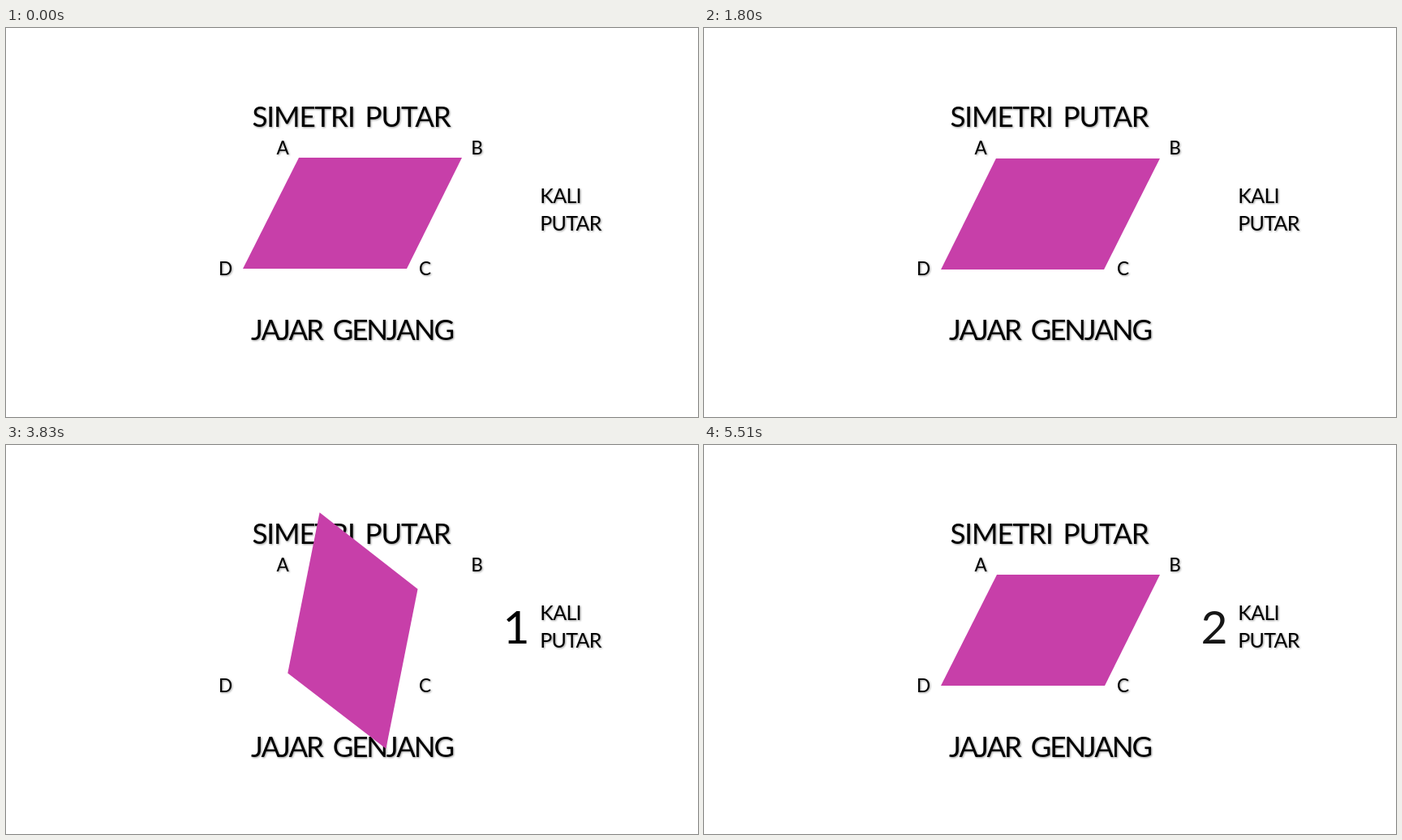
These frames come from a looping animation (853 by 480 pixels, 5.57 s). An HTML page:

```html
<!DOCTYPE html>
<html lang="id">
<head>
<meta charset="utf-8">
<title>Simetri Putar</title>
<style>
  html, body { margin: 0; width: 100%; height: 100%; overflow: hidden; background: #fff; }
  svg { display: block; width: 100vw; height: 100vh; }
  text { font-family: Lato, "Open Sans", sans-serif; fill: #000; text-anchor: middle; }
  .shade { filter: drop-shadow(1.2px 1.2px 0.8px rgba(0, 0, 0, 0.4)); }
  .title { font-size: 35px; letter-spacing: -1.1px; word-spacing: 5px; }
  .tight { letter-spacing: -2.1px; word-spacing: 6px; }
  .label { font-size: 22.5px; }
  .side { font-size: 25px; letter-spacing: -0.7px; text-anchor: start; }
  .digit { font-size: 57px; }
</style>
</head>
<body>
<svg viewBox="0 0 853 480">
  <g class="shade">
    <text class="title" x="425.5" y="122">SIMETRI PUTAR</text>
    <text class="title tight" x="426.5" y="385">JAJAR GENJANG</text>
    <text class="side" x="658.3" y="215.5">KALI</text>
    <text class="side" x="658.3" y="249.5">PUTAR</text>
  </g>
  <polygon id="shape" points="361,160 562,160 494,297 292,297" fill="#c73fa9"/>
  <g class="shade">
    <text class="label" x="341" y="156">A</text>
    <text class="label" x="580.5" y="156">B</text>
    <text class="label" x="516.5" y="304.5">C</text>
    <text class="label" x="270.5" y="304.5">D</text>
  </g>
  <text class="digit" id="one" x="629" y="245">1</text>
  <text class="digit" id="two" x="629" y="245">2</text>
</svg>
<script>
  const LOOP = 5570, STEP = 60;
  const [shape, one, two] = ["shape", "one", "two"].map(id => document.getElementById(id));
  const clamp = (v, lo = 0, hi = 1) => Math.min(hi, Math.max(lo, v));

  // Whole steps elapsed since a start time
  const steps = (t, start) => Math.floor((t - start) / STEP);

  // Half turn: speed ramps up over `ramp` steps, cruises, then ramps down
  function halfTurn(n, start, length, ramp) {
    const x = clamp(n - start, 0, length);
    const speed = 180 / (length - ramp);
    const ease = d => speed * d * d / (2 * ramp);
    if (x < ramp) return ease(x);
    if (x > length - ramp) return 180 - ease(length - x);
    return speed * (x - ramp / 2);
  }

  function angleAt(t) {
    if (t < 1860) return halfTurn(steps(t, 0), 0.03, 30.26, 6.1);
    if (t >= 2870 && t < 5270) return halfTurn(steps(t, 2810), 3.74, 24.3, 6.5);
    return 0;
  }

  function draw(t) {
    const fadeIn = clamp(steps(t, 1800) / 8);
    const swap = steps(t, 4610);
    shape.setAttribute("transform", `rotate(${angleAt(t)} 427 229)`);
    one.setAttribute("opacity", fadeIn * clamp(1 - swap / 8));
    two.setAttribute("opacity", clamp((swap - 7) / 8.8));
  }

  function tick() {
    draw(performance.now() % LOOP);
    requestAnimationFrame(tick);
  }
  tick();
</script>
</body>
</html>
```
